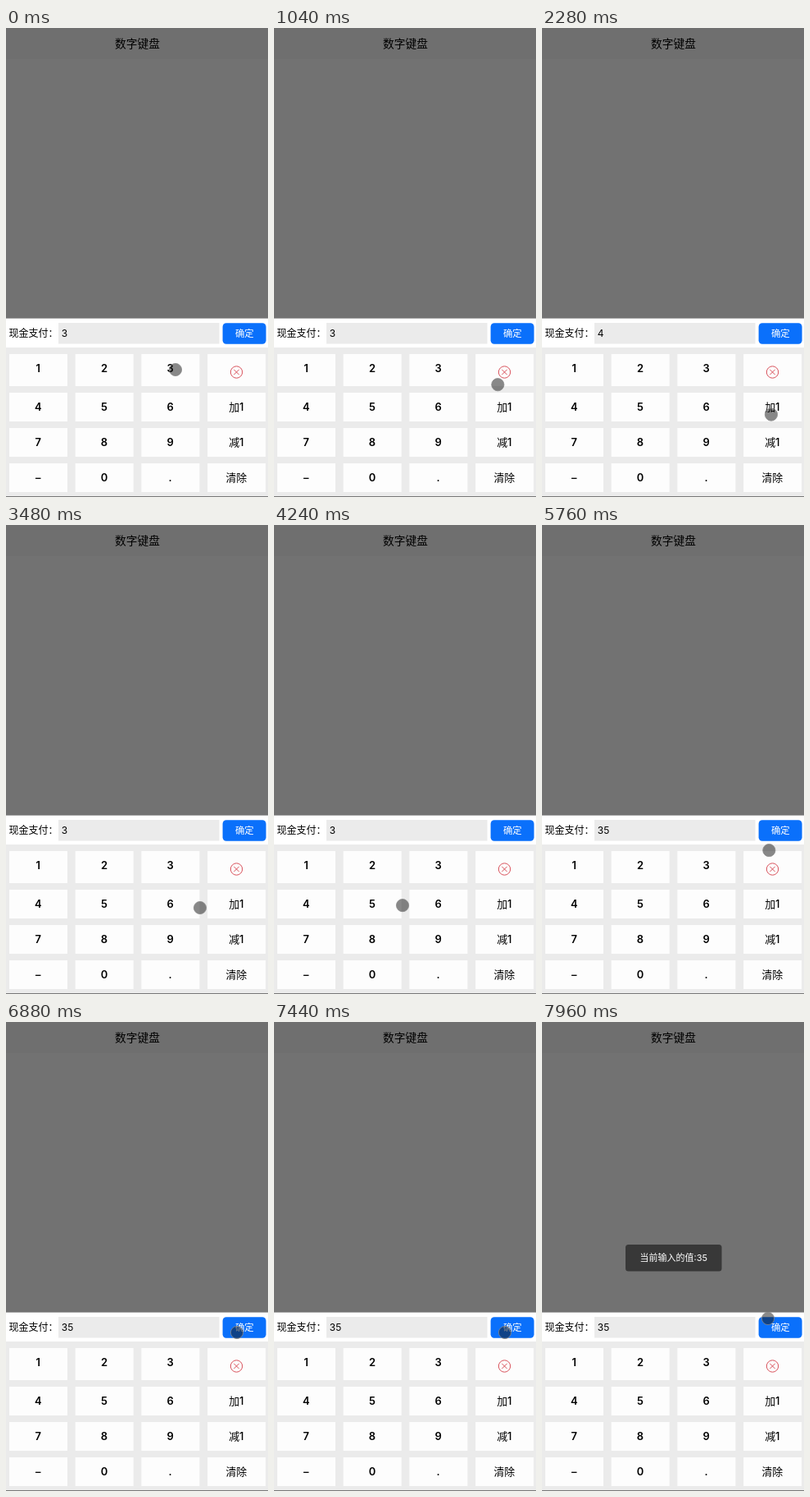
Recreate the animation shown at these times as an HTML page. Size 320 by 571 pixels, loop 8000 ms.

```html
<!DOCTYPE html>
<html lang="zh-CN">
<head>
<meta charset="utf-8">
<title>数字键盘</title>
<style>
html, body { margin: 0; width: 100%; height: 100%; overflow: hidden; background: #727272; }
svg { display: block; font: 500 12px Inter, "Noto Sans CJK SC", "Noto Sans CJK", sans-serif; }
.mid { text-anchor: middle; }
.key { font-size: 12.9px; }
</style>
</head>
<body>
<svg width="320" height="571" viewBox="0 0 320 571">
  <rect width="320" height="571" fill="#727272"/>
  <rect width="320" height="37.5" fill="#6f6f6f"/>
  <text class="mid" x="160.5" y="24" font-size="13.7">数字键盘</text>

  <rect y="353.6" width="320" height="36" fill="#fff"/>
  <text x="3.5" y="376" font-weight="400">现金支付：</text>
  <rect x="64" y="359" width="196.5" height="25.5" fill="#ebebeb"/>
  <text id="value" x="67.8" y="376" font-weight="400"></text>
  <rect id="ok" x="264.6" y="359.2" width="53" height="25.6" rx="4.5"/>
  <text class="mid" x="291.3" y="376" font-size="11.4" fill="#fff">确定</text>

  <rect y="389" width="320" height="182" fill="#ebebeb"/>
  <rect y="570" width="320" height="1" fill="#777"/>
  <g id="keys"></g>
  <g fill="none" stroke="#d9505a">
    <circle cx="281.5" cy="419" r="7.2"/>
    <path d="M278.3 415.8l6.4 6.4m0-6.4l-6.4 6.4"/>
  </g>

  <g id="toast">
    <rect x="102" y="271" width="117.5" height="32.5" rx="3.5" fill="#383838"/>
    <text class="mid" x="160.8" y="291" font-size="11" font-weight="400" fill="#fff">当前输入的值:35</text>
  </g>
  <circle id="touch" r="7.6" fill="#141414" fill-opacity=".5" stroke="#888" stroke-opacity=".8"/>
</svg>
<script>
const LOOP = 8000;
const $ = id => document.getElementById(id);

// the first row is a little taller than the others
const labels = [['1', '2', '3', ''], ['4', '5', '6', '加1'], ['7', '8', '9', '减1'], ['–', '0', '.', '清除']];
$('keys').innerHTML = labels.map((row, r) => row.map((label, c) => {
  const extra = r ? 0 : 4, x = 4 + c * 80.7, y = 401 + r * 43 - extra;
  const weight = label.length > 1 ? 500 : 600;
  return `<rect x="${x}" y="${y}" width="71" height="${35 + extra}" fill="#fdfdfd"/>` +
    `<text class="mid key" x="${x + 35.2}" y="${y + 22}" font-weight="${weight}">${label}</text>`;
}).join('')).join('');

// moves of the touch point: start, end, x, y
const home = [207, 416];
const moves = [
  [40, 840, 277, 433], [880, 1160, 271, 435], [1160, 1560, 279, 466], [2160, 2640, 285, 495],
  [3040, 3480, 237, 466], [3480, 3840, 195, 465], [3840, 4520, 135, 462],
  [4720, 5520, 275, 405], [5560, 6080, 282, 378], [7600, 7960, 276, 361]
];

const progress = (t, from, to) => Math.min(1, Math.max(0, (t - from) / (to - from)));
const smooth = u => u * u * (3 - 2 * u);

function touchAt(t) {
  let [x, y] = home;
  for (const [from, to, toX, toY] of moves) {
    const u = smooth(progress(t, from, to));
    x += (toX - x) * u;
    y += (toY - y) * u;
  }
  return [x, y];
}

function draw(t) {
  const [x, y] = touchAt(t);
  $('touch').setAttribute('cx', x);
  $('touch').setAttribute('cy', y);
  $('value').textContent = t >= 4720 ? '35' : t >= 2080 && t < 3040 ? '4' : '3';
  $('ok').setAttribute('fill', t >= 7600 && t < 7680 ? '#0062cc' : '#0a70fb');
  $('toast').setAttribute('opacity', progress(t, 7640, 7800));
}

const start = performance.now();
function tick() {
  draw((performance.now() - start) % LOOP);
  requestAnimationFrame(tick);
}
tick();
</script>
</body>
</html>
```
